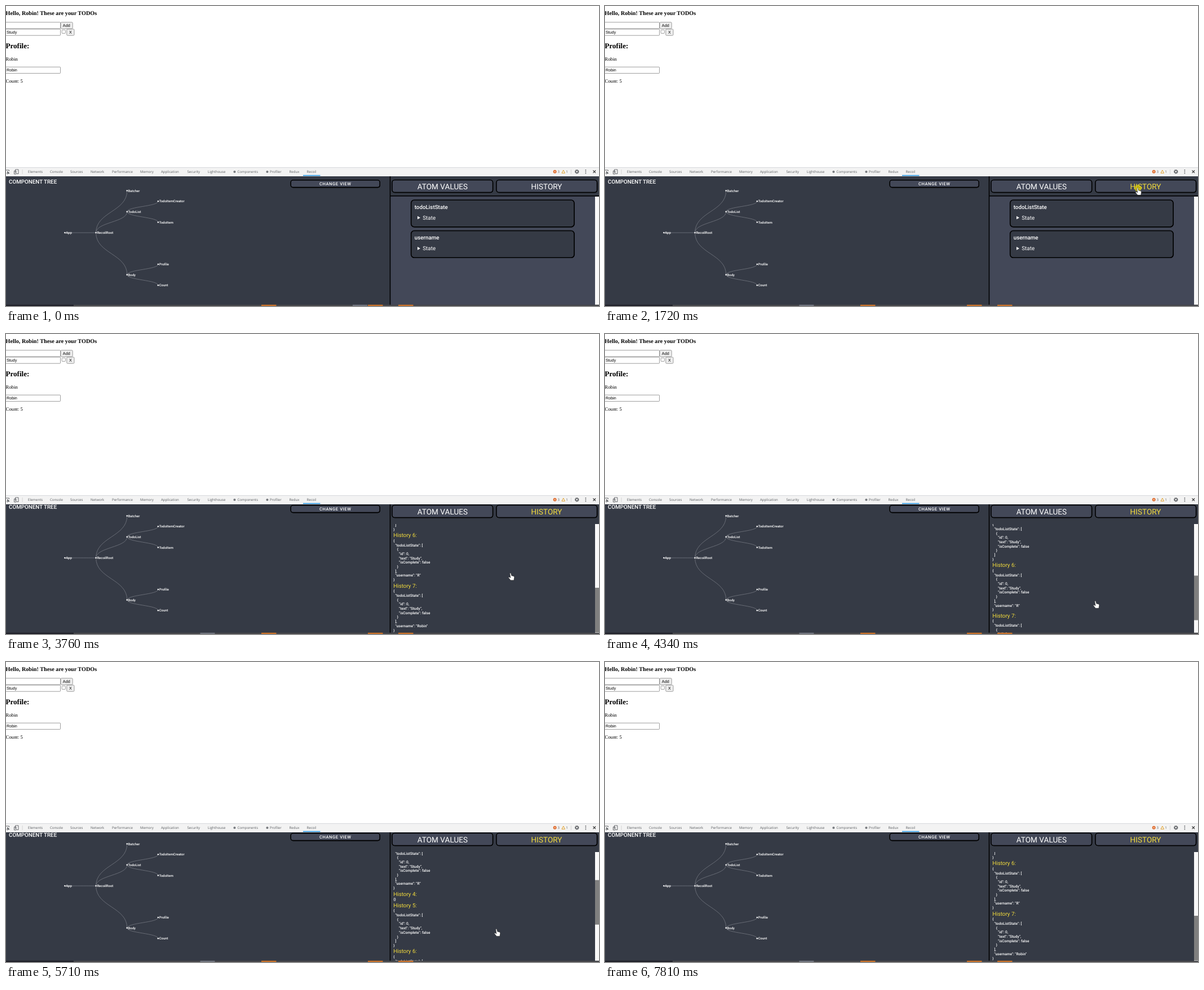
Animation of 1052 by 532 pixels, one loop 8 s. Source, as an HTML page:

```html
<!DOCTYPE html>
<html lang="en">
<head>
<meta charset="utf-8">
<title>Recoil state inspector</title>
<style>
  html, body { margin: 0; width: 100%; height: 100%; overflow: hidden; background: #fff; }
  svg { display: block; width: 100%; height: 100%; }
  text { text-rendering: geometricPrecision; white-space: pre; }
  .page { font-family: "Liberation Serif", serif; font-size: 8.73px; }
  .h3 { font-size: 10.2px; font-weight: 700; }
  .h2 { font-size: 13.1px; font-weight: 700; }
  .form { font-family: "Liberation Sans", sans-serif; font-size: 7.27px; }
  .field { fill: #fff; stroke: #858585; stroke-width: .8; }
  .button { fill: #efefef; stroke: #858585; stroke-width: .8; }
  .bar { font-family: "Open Sans", sans-serif; font-size: 6.1px; fill: #5a5d61; }
  .panel { font-family: Roboto, sans-serif; fill: #fff; }
  .node { font-size: 5.95px; font-weight: 500; }
  .title { font-size: 9.82px; font-weight: 500; }
  .view { font-size: 7.64px; font-weight: 500; letter-spacing: .55px; text-anchor: middle; }
  .tab { font-size: 13.64px; text-anchor: middle; }
  .body { font-size: 9.82px; }
  .json { font-size: 6.55px; font-weight: 500; }
  .dark { fill: #353a45; }
  .light { fill: #434858; }
  .edge { stroke: #000; stroke-width: 1.6; }
  .link { fill: none; stroke: #888c94; stroke-width: .6; }
  .icon { fill: none; stroke: #5a5d61; stroke-width: .9; }
</style>
</head>
<body>
<svg id="stage" viewBox="0 0 1052 532" preserveAspectRatio="none"></svg>
<script>
const LOOP = 8000, SWITCH = 1770, YELLOW = '#f3dc3d';
const USER = 'Robin';

const text = (x, y, str, cls, extra = '') => `<text x="${x}" y="${y}" class="${cls}" ${extra}>${str}</text>`;
const rect = (x, y, w, h, cls, extra = '') => `<rect x="${x}" y="${y}" width="${w}" height="${h}" class="${cls}" ${extra}/>`;
const block = (x, y, w, h, color) => rect(x, y, w, h, '', `fill="${color}"`);
const path = (d, cls, extra = '') => `<path d="${d}" class="${cls}" ${extra}/>`;
const dot = (x, y, r, fill) => `<circle cx="${x}" cy="${y}" r="${r}" fill="${fill}"/>`;
const box = (x, y, w, h, cls, r) =>
  rect(x + .6, y + .7, w, h, '', `rx="${r}"`) + rect(x, y, w, h, cls + ' edge', `rx="${r}"`);

function page() {
  return block(0, 0, 1052, 286, '#fff')
    + text(-.4, 16, `Hello, ${USER}! These are your TODOs`, 'page h3')
    + rect(-3, 28.8, 99.5, 11.2, 'field', 'rx=".8"')
    + rect(97, 28.8, 21.2, 11.4, 'button', 'rx="1.4"') + text(100.8, 37.2, 'Add', 'form')
    + rect(-3, 41, 99.5, 11.2, 'field', 'rx=".8"') + text(.9, 49, 'Study', 'form')
    + rect(99.2, 42.4, 6.2, 6.2, 'field', 'rx="1"')
    + rect(107.8, 41, 13.2, 11.2, 'button', 'rx="1.4"') + text(112, 49.2, 'X', 'form')
    + text(-.5, 75, 'Profile:', 'page h2')
    + text(-.4, 97, USER, 'page')
    + rect(-3, 108.2, 99.5, 11.2, 'field', 'rx=".8"') + text(.9, 116.3, USER, 'form')
    + text(-.4, 136, 'Count: 5', 'page');
}

function toolbar() {
  const tabs = { Elements: 39, Console: 78, Sources: 114, Network: 150, Performance: 188, Memory: 238,
    Application: 275, Security: 321.5, Lighthouse: 358, Components: 410.5, Profiler: 468, Redux: 502.5, Recoil: 533.5 };
  return block(0, 286, 1052, 16, '#f3f3f3') + block(0, 286, 1052, .7, '#cacdd1')
    + path('M-1 291H5.5V293M-1 296.500H1', 'icon') + path('M2 292.500L7 297H4.400L2.500 298.800Z', '', 'fill="#5a5d61"')
    + path('M16.500 296V290H22V297.500H19M14.500 292.500H18V298H14.500Z', 'icon')
    + block(28.7, 290, .7, 8, '#c8c8c8')
    + Object.entries(tabs).map(([name, x]) => text(x, 296.2, name, 'bar', name === 'Recoil' ? 'fill="#333"' : '')).join('')
    + dot(405.5, 294, 2.1, '#777a7e') + dot(463.5, 294, 2.1, '#777a7e')
    + block(527, 299.8, 30.5, 1.5, '#1a8fe0')
    + dot(973.7, 293.7, 3, '#df6b2b') + path('M972.500 292.500l2.400 2.400m0-2.400l-2.400 2.400', '', 'stroke="#fff" stroke-width=".7"')
    + text(978.6, 296, '3', 'bar')
    + path('M988.800 291L991.600 296.300H986Z', '', 'fill="none" stroke="#e2a12b" stroke-width="1"') + text(993.3, 296, '1', 'bar')
    + block(1002.3, 290, .7, 8, '#c8c8c8')
    + `<circle cx="1012.800" cy="293.800" r="3.100" class="icon" style="stroke-width:1.300;stroke-dasharray:1.600 .8"/>`
    + `<circle cx="1012.800" cy="293.800" r="2.100" class="icon" style="stroke-width:1.300"/>`
    + [291, 293.8, 296.6].map(y => dot(1028.4, y, .9, '#5a5d61')).join('')
    + path('M1041.500 291.500l4.600 4.600m0-4.600l-4.600 4.600', 'icon', 'style="stroke-width:1.100;stroke:#333"');
}

function tree() {
  const nodes = { App: [104.5, 402], RecoilRoot: [159.6, 402, 'App'], Batcher: [214.8, 327.5, 'RecoilRoot'],
    TodoList: [214.8, 364.8, 'RecoilRoot'], Body: [214.8, 476.6, 'RecoilRoot'],
    TodoItemCreator: [269.9, 346.2, 'TodoList'], TodoItem: [269.9, 383.5, 'TodoList'],
    Profile: [269.9, 458, 'Body'], Count: [269.9, 495.3, 'Body'] };
  let links = '', labels = '';
  for (const [name, [x, y, parent]] of Object.entries(nodes)) {
    if (parent) {
      const [px, py] = nodes[parent], mid = (y + py) / 2;
      links += path(`M${px} ${py}C${px} ${mid} ${x} ${mid} ${x} ${y}`, 'link');
    }
    labels += dot(x, y, 1.3, '#fff') + text(x + 1.8, y + 2.1, name, 'panel node');
  }
  return text(5, 315.2, 'COMPONENT TREE', 'panel title') + links + labels
    + box(505.2, 308.8, 158, 12.8, 'light', 4) + text(584.2, 317.9, 'CHANGE VIEW', 'panel view');
}

const header = () =>
  box(685, 308.5, 178.6, 22, 'light', 4.5) + text(774.4, 324.6, 'ATOM VALUES', 'panel tab')
  + box(870, 308.5, 178.6, 22, 'light', 4.5) + text(959, 324.6, 'HISTORY', 'panel tab', 'id="history-tab"');

function atoms() {
  const card = (y, name) => box(718.7, y, 289.3, 47.7, 'dark', 5.5)
    + text(724.7, y + 15.6, name, 'panel title')
    + path(`M730 ${y + 28.6}L735 ${y + 31.4}L730 ${y + 34.2}Z`, '', 'fill="#fff"')
    + text(739.3, y + 34.8, 'State', 'panel body');
  return rect(682, 337, 370, 193, 'light') + block(682, 336, 370, 1.6, '#000')
    + card(344, 'todoListState') + card(398.5, 'username')
    + block(1045, 338, 7, 192, '#f8f8f8');
}

function history() {
  const todo = { todoListState: [{ id: 0, text: 'Study', isComplete: false }] };
  const withUser = username => ({ ...todo, username });
  const states = [{}, todo, withUser(USER[0]), {}, todo, withUser(USER[0]), withUser(USER)];
  let y = 342.5, out = '';
  states.forEach((state, i) => {
    const lines = JSON.stringify(state, null, 2).split('\n');
    out += text(687.3, y + 3.6, `History ${i + 1}:`, 'panel body', `style="fill:${YELLOW}"`);
    lines.forEach((line, n) => {
      const indent = line.search(/\S/);
      out += text(687.3 + indent * 1.63, y + 12.3 + n * 7.7, line.trim(), 'panel json');
    });
    y += 12.4 + lines.length * 7.7;
  });
  return rect(682, 337, 370, 193, 'dark')
    + `<g clip-path="url(#list)"><g id="entries">${out}</g></g>`
    + block(1045, 337, 7, 193, '#f8f8f8') + rect(1045, 337, 7, 79, '', 'id="thumb" fill="#7f7f7f"');
}

const taskbar = () => block(0, 529.7, 1052, 2.3, '#45464a') + block(0, 529.7, 120, 2.3, '#1e1f28')
  + [453, 642, 696].map(x => block(x, 529.7, 26.5, 2.3, '#c8712a')).join('')
  + rect(615, 529.7, 26, 2.3, '', 'id="task" fill="#70747e"');

document.getElementById('stage').innerHTML = `
  <defs><clipPath id="list">${rect(682, 337, 363, 193, '')}</clipPath>
  <clipPath id="tools">${rect(0, 301.5, 1052, 228.5, '')}</clipPath></defs>
  ${page()}${rect(0, 301.5, 1052, 229, 'dark')}
  <g clip-path="url(#tools)"><g id="shifted">${tree()}${header()}</g>
  <g id="atoms">${atoms()}</g><g id="history">${history()}</g>
  ${block(680.7, 301.5, 1.6, 230, '#000')}</g>
  ${toolbar()}${taskbar()}
  <circle id="click" r="6" fill="#e6d400" opacity=".7"/>
  <g id="cursor" stroke="#222" stroke-width=".6" fill="#fff" stroke-linejoin="round">
    <path id="arrow" d="M0 0V10.500L2.400 8.300L4 12L5.600 11.300L4 7.700H7.400Z"/>
    <path id="hand" d="M-1 1.200Q.2-.4 1 1L2 5L5.600 5.900Q7.300 6.400 7 8.300L6.200 13.300H.4L-3.200 8.700Q-3.500 7.200-2 7.500L.2 8.800Z"/>
  </g>`;

// Keys are [time, ...values]; values are held before the first and after the last key.
function track(keys, t, ease = k => k) {
  const i = keys.findIndex(key => key[0] > t);
  if (i < 0) return keys[keys.length - 1].slice(1);
  if (i === 0) return keys[0].slice(1);
  const [a, b] = [keys[i - 1], keys[i]], k = ease((t - a[0]) / (b[0] - a[0]));
  return a.slice(1).map((v, n) => v + (b[n + 1] - v) * k);
}
const smooth = k => k * k * (3 - 2 * k);

const SCROLL = [[3430, 0], [3740, 279], [4220, 279], [4680, 77], [4860, 77], [4900, 55.3], [4960, 55.3],
  [5100, 0], [5490, 0], [5710, 122.7], [5740, 122.7], [6080, 279]];
const POINTER = [[560, 630, 515], [1390, 944.5, 322], [2130, 944.5, 322], [2830, 898.5, 391], [3430, 898.5, 391],
  [3740, 894.8, 423.5], [3800, 894.8, 423.5], [4210, 869.8, 473], [6860, 869.8, 473], [7140, 307, 266],
  [7340, 307, 266], [7780, 4, 137]];

const el = id => document.getElementById(id);
const show = (id, on) => el(id).setAttribute('display', on ? 'inline' : 'none');
const move = (id, x, y) => el(id).setAttribute('transform', `translate(${x} ${y})`);

function draw(t) {
  const switched = t >= SWITCH;
  const [scroll] = track(SCROLL, t);
  const [x, y] = track(POINTER, t, smooth);
  const hover = t >= 590 && x > 870 && y > 308 && y < 331;
  const hand = t >= 1440 && x > 682;

  show('atoms', !switched);
  show('history', switched);
  move('shifted', 0, switched ? -5 : 0);
  el('history-tab').style.fill = switched || hover ? YELLOW : '#fff';
  move('entries', 0, -scroll);
  move('thumb', 0, scroll * .405);
  el('task').setAttribute('x', t < 1650 ? 615 : 344.5);

  show('cursor', t >= 590 && t < 7810);
  show('arrow', !hand);
  show('hand', hand);
  move('cursor', x, y);
  show('click', t >= 1650 && t < 1850);
  move('click', x + 1, y + 1);
}

function frame() {
  draw(performance.now() % LOOP);
  requestAnimationFrame(frame);
}
frame();
</script>
</body>
</html>
```
